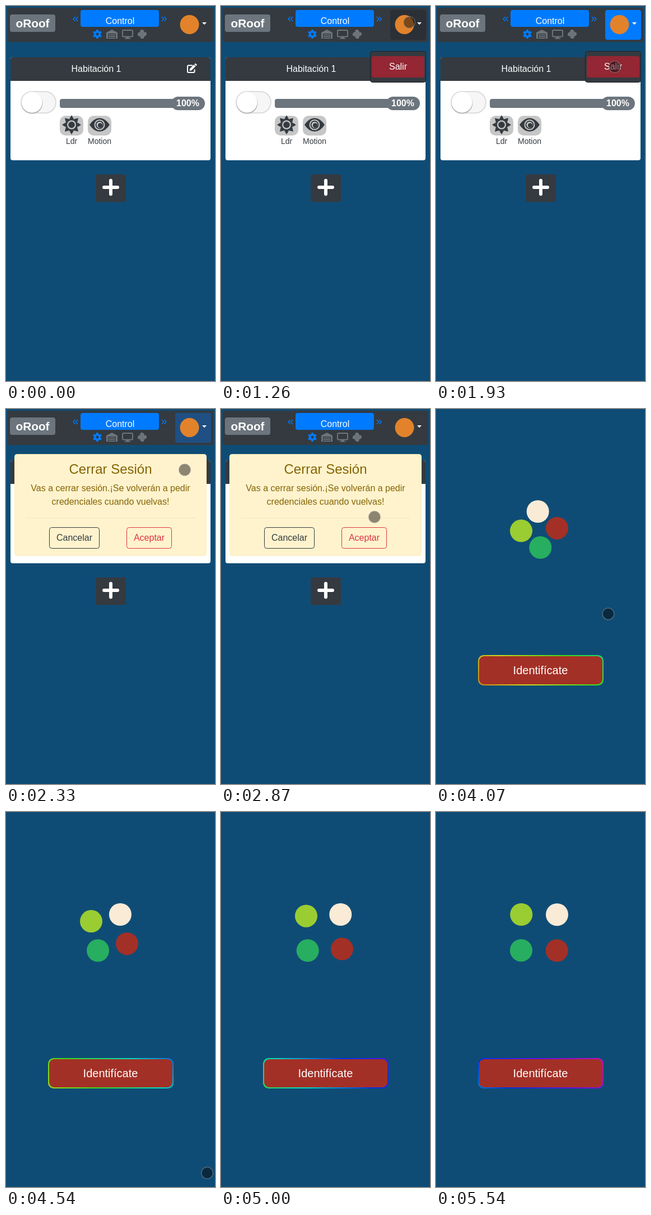
An HTML page for the animation above (5.6 s loop, 373 px wide and 666 px high).

```html
<!DOCTYPE html>
<html lang="es">
<head>
<meta charset="utf-8">
<title>Control</title>
<style>
  html, body { margin: 0; width: 100%; height: 100%; overflow: hidden; background: #0f4c75; }
  svg { display: block; width: 373px; height: 666px; }
  text { font: 16px "Liberation Sans", Arial, sans-serif; text-anchor: middle; fill: #fff; }
  .bold { font-weight: bold; }
  .dark { fill: #343a40; }
  .grey { fill: #6c757d; }
  .blue { fill: #007bff; }
  .amber { fill: #856404; }
  .line { fill: none; stroke-width: 2; }
</style>
</head>
<body>
<svg viewBox="0 0 373 666">
  <defs>
    <linearGradient id="rainbow" gradientUnits="userSpaceOnUse" spreadMethod="repeat" x1="75" y1="491" x2="550" y2="16"></linearGradient>
    <path id="blade" d="M0 0C-3-1-4-3-3.500-6C-3-8-1-8.500 0-8C3-7.500 4.500-5 3.500-2.500Z"/>
    <path id="ray" d="M-4-10.500L0-17L4-10.500Z"/>
    <rect id="tooth" x="-2" y="-8" width="4" height="4" rx="1"/>
  </defs>

  <g id="home">
    <rect class="dark" x="3" y="3" width="367" height="61" rx="4"/>
    <rect class="grey" x="7" y="15" width="81" height="31" rx="4"/>
    <text class="bold" x="47.500" y="38" style="font-size:20.8px">oRoof</text>
    <rect class="blue" x="133" y="7" width="140" height="30" rx="4"/>
    <text x="203.500" y="32">Control</text>
    <text class="blue" x="124" y="28" style="font-size:20px">«</text>
    <text class="blue" x="282" y="28" style="font-size:20px">»</text>

    <g class="blue" transform="translate(163 50)">
      <g data-spin="tooth" data-n="6"></g>
      <circle r="4.200" class="line" stroke="#007bff" style="stroke-width:3.500"/>
    </g>
    <path class="grey" d="M179 58V47L189 42L199 47V58H196V49H182V58ZM183 50.500H195V52H183ZM183 53.200H195V55H183ZM183 56.200H195V58H183Z"/>
    <g class="grey">
      <rect class="line" x="208" y="43" width="18" height="11.500" rx="1.500" stroke="#6c757d"/>
      <path d="M215 55H219L220 57H222V58.500H212V57H214Z"/>
    </g>
    <g class="grey" transform="translate(243 50)" data-spin="blade" data-n="4"></g>

    <rect id="hover" x="302" y="7" width="64" height="53" rx="4" fill="#2b3036"/>
    <rect id="active" class="blue" x="302" y="7" width="64" height="53" rx="4"/>
    <circle cx="327.500" cy="33" r="17" fill="#e2832c"/>
    <path fill="#fff" d="M350 29H358L354 33.200Z"/>

    <rect x="8" y="91" width="357" height="183" rx="4" fill="#fff"/>
    <path class="dark" d="M8 133V95Q8 91 12 91H361Q365 91 365 95V133Z"/>
    <text x="161" y="117">Habitación 1</text>
    <path class="line" stroke="#fff" d="M333 105.500H325.500Q324 105.500 324 107V116.500Q324 118 325.500 118H335Q336.500 118 336.500 116.500V112.500"/>
    <path fill="#fff" d="M328 111.500L335.500 104L338.500 107L331 114.500L327.500 115ZM336.300 103.200L337.500 102.200Q338.300 101.800 339 102.500L340.500 104Q341 104.700 340.500 105.300L339.300 106.300Z"/>

    <rect x="27" y="152" width="62" height="38" rx="19" fill="#f6f6f6" stroke="#dcdcdc" stroke-width="2"/>
    <circle cx="46.500" cy="172.500" r="19" fill="#b5b5b5"/>
    <circle cx="46.300" cy="171" r="18.500" fill="#fff"/>
    <rect class="grey" x="96" y="165" width="250" height="16" rx="4"/>
    <rect class="grey" x="295" y="161" width="60" height="24" rx="12"/>
    <text class="bold" x="324.500" y="178">100%</text>

    <rect x="96" y="195" width="42" height="35" rx="10" fill="#c6c6c6"/>
    <rect x="146" y="195" width="42" height="35" rx="10" fill="#c6c6c6"/>
    <g class="dark" transform="translate(117 211)">
      <g data-spin="ray" data-n="8"></g>
      <circle r="9.500" class="line" stroke="#343a40" style="stroke-width:3"/>
      <circle r="5.800"/>
    </g>
    <g transform="translate(167 211)">
      <path class="dark" d="M-18 0Q-10-12 0-12Q10-12 18 0Q10 12 0 12Q-10 12-18 0Z"/>
      <circle r="8.500" class="line" stroke="#c6c6c6"/>
      <circle r="5.500" fill="#c6c6c6"/>
      <circle cx="1" cy="1" r="4" class="dark"/>
    </g>
    <text class="dark" x="117" y="245" style="font-size:14px">Ldr</text>
    <text class="dark" x="167" y="245" style="font-size:14px">Motion</text>

    <rect class="dark" x="160" y="299" width="54" height="49" rx="4"/>
    <path d="M187 310V334M175 322H199" stroke="#fff" stroke-width="6" stroke-linecap="round"/>

    <g id="menu">
      <rect class="dark" x="266.500" y="80.500" width="99" height="55" rx="4" stroke="#1f2327"/>
      <rect x="269" y="89" width="94" height="38" rx="4" fill="#942733"/>
      <text x="316" y="113">Salir</text>
    </g>

    <g id="modal">
      <rect x="15.500" y="80.500" width="342" height="180" rx="4" fill="#fff3cd" stroke="#ffeeba"/>
      <text class="amber" x="186.500" y="115" style="font-size:24px">Cerrar Sesión</text>
      <text class="amber" x="186.500" y="146">Vas a cerrar sesión.¡Se volverán a pedir</text>
      <text class="amber" x="186.500" y="170">credenciales cuando vuelvas!</text>
      <path d="M36 193.500H337" stroke="#000" stroke-opacity=".06"/>
      <rect x="77.500" y="210.500" width="89" height="37" rx="4" fill="none" stroke="#343a40"/>
      <text class="dark" x="122" y="234">Cancelar</text>
      <rect id="accept" x="215.500" y="210.500" width="80" height="37" rx="4" fill="#dc3545" stroke="#dc3545"/>
      <text id="acceptText" x="255.500" y="234">Aceptar</text>
    </g>
  </g>

  <g id="login">
    <circle class="dot" r="20" fill="#faebd7"/>
    <circle class="dot" r="20" fill="#a33026"/>
    <circle class="dot" r="20" fill="#27ae60"/>
    <circle class="dot" r="20" fill="#9acd32"/>
    <rect x="75" y="437" width="224" height="54" rx="10" fill="url(#rainbow)" opacity=".8"/>
    <rect x="77" y="439" width="220" height="50" rx="9" fill="#a33026"/>
    <text x="186.500" y="471" style="font-size:20px">Identifícate</text>
  </g>

  <circle id="pointer" r="10.300" fill="#000" fill-opacity=".45" stroke="#909090" stroke-opacity=".5" stroke-width="1.500"/>
</svg>

<script>
const LOOP = 5600, FPS = 0.015, LOGIN = 3515;
const $ = id => document.getElementById(id);
const dots = document.querySelectorAll('.dot');

// Repeated parts around a centre
for (const g of document.querySelectorAll('[data-spin]')) {
  const n = +g.dataset.n;
  for (let i = 0; i < n; i++)
    g.innerHTML += `<use href="#${g.dataset.spin}" transform="rotate(${i * 360 / n})"/>`;
}

const hues = ['#f00', '#ff7300', '#fffb00', '#48ff00', '#00ffd5', '#002bff', '#7a00ff', '#ff00c8', '#f00'];
$('rainbow').innerHTML = hues.map((c, i) => `<stop offset="${i / 8}" stop-color="${c}"/>`).join('');

// Pointer path: time, x, y
const path = [
  [600, 388, 28], [933, 336, 30], [1267, 336, 29], [1667, 334, 74],
  [1933, 319, 108], [2533, 319, 108], [3133, 255, 227], [3840, 255, 227],
  [4400, 352, 480], [4533, 359, 641], [4733, 388, 638]
];
const corners = [[152, 182], [216, 182], [216, 246], [152, 246]];

const ramp = (t, a, b) => Math.min(1, Math.max(0, (t - a) / (b - a)));
const mix = (a, b, k) => a + (b - a) * k;
const show = (id, on) => $(id).style.display = on ? '' : 'none';
const place = (el, a, b, k) => {
  el.setAttribute('cx', mix(a[0], b[0], k));
  el.setAttribute('cy', mix(a[1], b[1], k));
};

// cubic-bezier(.25, .1, .25, 1)
function ease(x) {
  let lo = 0, hi = 1;
  for (let i = 0; i < 20; i++) {
    const s = (lo + hi) / 2;
    if (0.75 * s * (1 - s) + s ** 3 < x) lo = s; else hi = s;
  }
  return 0.3 * lo * (1 - lo) ** 2 + 3 * lo * lo * (1 - lo) + lo ** 3;
}

function movePointer(t) {
  const i = Math.max(1, path.findIndex(p => p[0] >= t));
  const [a, b] = t > path.at(-1)[0] ? path.slice(-2) : [path[i - 1], path[i]];
  place($('pointer'), a.slice(1), b.slice(1), 1 - (1 - ramp(t, a[0], b[0])) ** 1.5);
}

function draw(t) {
  const closing = 1 - ramp(t, 2100, 2467);
  $('hover').style.opacity = ramp(t, 1100, 1233) * closing;
  $('active').style.opacity = ramp(t, 1300, 1533) * closing;
  show('menu', t > 1190 && t < 2190);
  $('modal').style.opacity = ramp(t, 2100, 2333);

  const press = ramp(t, 3200, 3333);
  $('accept').style.fillOpacity = press;
  $('acceptText').style.fill = `rgb(${mix(220, 255, press)},${mix(53, 255, press)},${mix(69, 255, press)})`;

  const out = t > LOGIN, age = Math.max(0, t - LOGIN);
  show('home', !out);
  show('login', out);
  const edge = Math.floor(age / 2000), k = ease(age / 2000 % 1);
  dots.forEach((d, i) => place(d, corners[(edge + i) % 4], corners[(edge + i + 1) % 4], k));
  $('rainbow').setAttribute('gradientTransform', `translate(${-0.2688 * age} 0)`);
  movePointer(t);
}

let start;
function tick(now) {
  start ??= now;
  const t = (now - start) % LOOP;
  draw(Math.floor((t + 7) * FPS) % 84 / FPS);
  requestAnimationFrame(tick);
}
draw(0);
requestAnimationFrame(tick);
</script>
</body>
</html>
```
